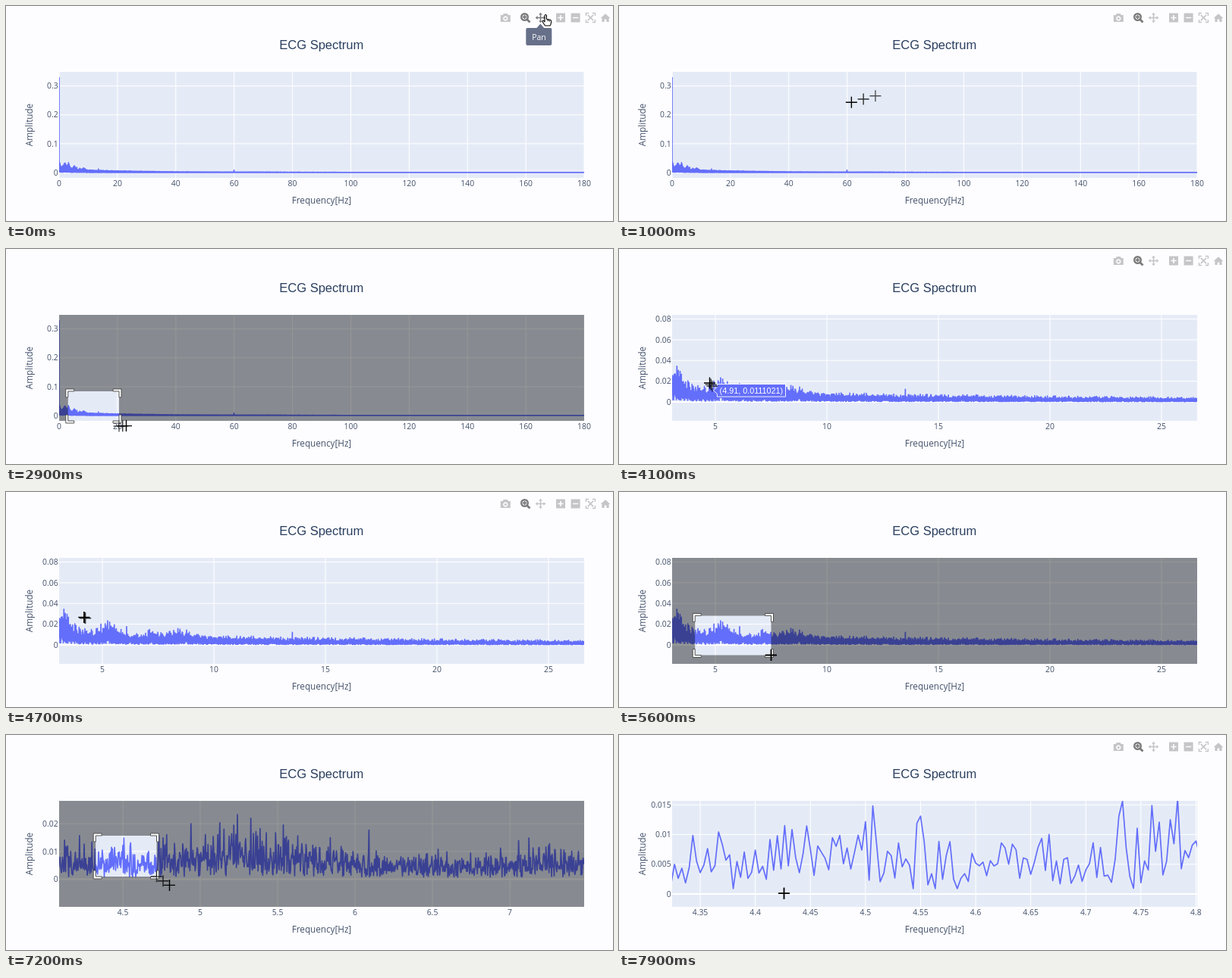
Animation, 800 px wide and 284 px high, one loop 8000 ms. Source, as an HTML page:

```html
<!DOCTYPE html>
<html lang="en">
<head>
<meta charset="utf-8">
<title>ECG Spectrum</title>
<style>
  html, body { margin: 0; width: 100%; height: 100%; overflow: hidden; background: #fdfdff; }
  svg { display: block; width: 100vw; height: 100vh; }
  text { fill: #43516a; font-family: "Open Sans", sans-serif; }
  .title { fill: #2a3f5f; font: 16.5px "Liberation Sans", Arial, sans-serif; text-anchor: middle; }
  .axis { font-size: 11.7px; text-anchor: middle; }
  .tick { font-size: 10.4px; }
  .xt { text-anchor: middle; }
  .yt { text-anchor: end; }
  .grid { stroke: #fff; stroke-width: 1; fill: none; }
  .zero { stroke: #fff; stroke-width: 1.8; }
  .trace { fill: none; stroke: #636efa; stroke-width: 1.7; stroke-linejoin: round; }
  .icon { fill: #444; fill-rule: evenodd; opacity: .3; }
  .icon.on { opacity: .7; }
  .line { fill: none; stroke: #444; stroke-width: 2; }
  .tip rect, .tip path { fill: #677089; }
  .tip text { fill: #fff; font-size: 10.4px; text-anchor: middle; }
  .label path { fill: #636efa; stroke: #fff; stroke-width: .9; }
  .label text { fill: #fff; font: 10.8px "Liberation Sans", Arial, sans-serif; }
  .cross { stroke: #000; stroke-width: 1.4; }
  .hand { fill: #fff; stroke: #000; stroke-width: 1.1; stroke-linejoin: round; }
</style>
</head>
<body>
<svg viewBox="0 0 800 284">
  <defs>
    <clipPath id="clip"><rect x="70" y="87" width="692" height="140"/></clipPath>
    <path id="plus" d="M-7.5 0H7.5M0-7.5V7.5"/>
  </defs>
  <text class="title" x="415.8" y="57">ECG Spectrum</text>
  <rect x="70" y="87" width="692" height="140" fill="#e5ebf6"/>
  <g id="views"></g>
  <text class="axis" x="416" y="260.8">Frequency[Hz]</text>
  <text class="axis" transform="translate(34.8 157) rotate(-90)">Amplitude</text>

  <g id="bar">
    <g class="icon" transform="translate(658.3 15.5)">
      <path d="M-6.5-3.5h3l1-2h5l1 2h3v9h-13zM0-2.2a3.2 3.2 0 1 0 .01 0zM0-.6a1.6 1.6 0 1 0 .01 0z"/>
    </g>
    <g class="icon on" transform="translate(684.5 15.5)">
      <circle class="line" cx="-1" cy="-1" r="4.3" style="stroke-width:2.4"/>
      <path class="line" d="M2.2 2.2L6 6" style="stroke-width:2.8"/>
      <path class="line" d="M-3.6-1h5.2M-1-3.6v5.2" style="stroke-width:1.8"/>
    </g>
    <g class="icon" id="pan" transform="translate(704.5 15.5)">
      <path class="line" d="M-5 0H5M0-5V5" style="stroke-width:1.5"/>
      <path d="M0-6.8l2.5 2.8h-5zM0 6.8l2.5-2.8h-5zM-6.8 0l2.8-2.5v5zM6.8 0l-2.8-2.5v5z"/>
    </g>
    <g class="icon" transform="translate(731 15.5)">
      <path d="M-6-6H6V6H-6zM-.8-3.6V-.8H-3.6V.8H-.8V3.6H.8V.8H3.6V-.8H.8V-3.6z"/>
    </g>
    <g class="icon" transform="translate(750.6 15.5)"><path d="M-6-6H6V6H-6zM-3.6-.8V.8H3.6V-.8z"/></g>
    <g class="icon" transform="translate(770.4 15.5)">
      <path class="line" d="M-6-2.5V-6H-2.5M2.5-6H6V-2.5M6 2.5V6H2.5M-2.5 6H-6V2.5" style="stroke-width:1.4"/>
      <path class="line" d="M-3.6-3.6L3.6 3.6M3.6-3.6L-3.6 3.6" style="stroke-width:1.5"/>
    </g>
    <g class="icon" transform="translate(790 15.5)"><path d="M-6.3.6L0-5.2L6.3.6H4.6V5.4H1.4V2H-1.4V5.4H-4.6V.6z"/></g>
  </g>
  <g class="tip" id="tip">
    <path d="M699 29.5l5.3-6 5.3 6z"/>
    <rect x="685.3" y="29" width="34" height="23" rx="2"/>
    <text x="702.5" y="44.6">Pan</text>
  </g>

  <path id="shade" fill-rule="evenodd"/>
  <path id="corners" fill="#fff" stroke="#444" stroke-width=".9"/>
  <g class="label" id="label"><path/><text x="8.2" y="3.9"></text></g>

  <use class="cross ghost" href="#plus" opacity=".65"/>
  <use class="cross ghost" href="#plus" opacity=".8"/>
  <use class="cross" id="cross" href="#plus"/>
  <path id="arrow" class="hand" d="M0 0V12l2.8-2.6L4.8 13.6l1.8-.8-1.9-4H8.4z"/>
  <g id="hand" class="hand">
    <path d="M-2-5.2c0-1.7 2.4-1.7 2.4 0v4.4l4.8 1c1.1.3 1.6 1 1.5 2.2L6 6.2 5 8H-1.5L-4.8 3c-.8-1.4.9-2.3 1.8-1.2l1 1.2z"/>
    <path d="M2.3 0v2M4.4.5v1.9" fill="none"/>
  </g>
</svg>
<script>
const LOOP = 8000, STEP = 100;
const LEFT = 70, RIGHT = 762, TOP = 87, BOTTOM = 227;
const RATE = 300; // spectrum samples per Hz
const $ = id => document.getElementById(id);
const clamp = (v, lo, hi) => Math.min(hi, Math.max(lo, v));

// Noise level: a slow decay with bumps of [centre, width, height], in thousandths.
const BUMPS = [[0, .4, 13], [2, 1.3, 6], [3.3, .4, 4], [5, 2.5, .9], [5.35, .45, 2.6], [7.25, .25, 1.3], [8.6, .6, 2]];
const bell = (f, [mid, width, height]) => height * Math.exp(-(((f - mid) / width) ** 2));
const level = f => (4 * Math.exp(-f / 22) + .15 + BUMPS.reduce((sum, b) => sum + bell(f, b), 0)) / 1000;

// Lines that stand out of the noise: [frequency, amplitude].
const PEAKS = [[0, .33], [4.22, .0157], [4.366667, .0104374], [4.426667, .0115], [4.546667, .0119],
  [4.73, .0131], [4.776667, .0125], [4.91, .0111021], [4.94, .02], [5.24, .0233], [5.326667, .022],
  [6.09, .0177], [13.52, .0122], [60, .008]];

function makeSpectrum() {
  let seed = 20731;
  const rand = () => (seed = (seed * 16807) % 2147483647) / 2147483647;
  const data = Array.from({ length: 180 * RATE + 1 }, (_, i) =>
    level(i / RATE) * clamp(Math.sqrt(-2 * Math.log(rand())), .2, 3.3));
  PEAKS.forEach(([f, v]) => data[Math.round(f * RATE)] = v);
  return data;
}
const spectrum = makeSpectrum();

// f0: frequency at the left edge; sx, sy: pixels per unit; y0: zero line;
// drag: when the next zoom box is started; xt: first, step, count; yt: step, count.
const VIEWS = [
  { at: 0, drag: 1900, f0: 0, sx: 692 / 180, y0: 220, sy: 381.5, xt: [0, 20, 10], yt: [.1, 4] },
  { at: 3300, drag: 5000, f0: 3.061, sx: 29.4, y0: 202, sy: 1369, xt: [5, 5, 5], yt: [.02, 5] },
  { at: 5800, drag: 6800, f0: 4.0882, sx: 204, y0: 190.5, sy: 3670, xt: [4.5, .5, 6], yt: [.01, 3] },
  { at: 7400, f0: 4.3245, sx: 1452, y0: 210, sy: 7850, xt: [4.35, .05, 10], yt: [.005, 4] }
];
VIEWS.forEach(v => {
  v.x = f => LEFT + (f - v.f0) * v.sx;
  v.y = a => v.y0 - a * v.sy;
  v.sample = x => Math.round(((x - LEFT) / v.sx + v.f0) * RATE);
});
// Each drag starts at the top left corner of the view it opens.
const DRAGS = VIEWS.slice(1).map((next, i) => {
  const v = VIEWS[i];
  return { from: v.drag, to: next.at, x: v.x(next.f0), y: v.y((next.y0 - TOP) / next.sy) };
});

function tracePath(v) {
  const first = Math.max(0, v.sample(LEFT) - 1);
  const last = Math.min(spectrum.length - 1, v.sample(RIGHT) + 1);
  const group = Math.max(1, Math.round(.3 * RATE / v.sx));
  const pts = [];
  for (let i = first; i <= last; i += group) {
    const part = spectrum.slice(i, i + group), x = v.x(i / RATE).toFixed(2);
    pts.push(x + " " + v.y(Math.max(...part)).toFixed(1));
    if (group > 1) pts.push(x + " " + v.y(Math.min(...part)).toFixed(1));
  }
  return "M" + pts.join("L");
}

function viewMarkup(v) {
  let grid = "", text = "";
  const [start, step, count] = v.xt, [yStep, yCount] = v.yt;
  for (let i = 0; i < count; i++) {
    const f = start + i * step, x = v.x(f);
    grid += `M${x} ${TOP}V${BOTTOM}`;
    text += `<text class="tick xt" x="${x}" y="238.2">${+f.toFixed(2)}</text>`;
  }
  for (let i = 0; i < yCount; i++) {
    const y = v.y(i * yStep);
    if (i) grid += `M${LEFT} ${y}H${RIGHT}`;
    text += `<text class="tick yt" x="68.7" y="${y + 3.7}">${+(i * yStep).toFixed(3)}</text>`;
  }
  return `<g><g clip-path="url(#clip)"><path class="grid" d="${grid}"/>
    <path class="zero" d="M${LEFT} ${v.y0}H${RIGHT}"/>
    <path class="trace" d="${tracePath(v)}"/></g>${text}</g>`;
}
$("views").innerHTML = VIEWS.map(viewMarkup).join("");
const groups = [...$("views").children];

// Pointer stops: time, x, y.
const POINTER = [[0, 712, 18], [100, 712, 18], [1500, 81, 188], [1760, 81, 188], [1900, 99, 216.5],
  [2830, 149, 234], [3000, 172, 233], [3400, 172, 232], [4000, 124.4, 183], [4100, 119.5, 177],
  [4800, 100, 163.5], [5000, 100, 163.5], [5500, 200.5, 215.5], [5900, 200.5, 215.5], [6500, 126.7, 133],
  [6600, 122, 135], [6800, 118.3, 133], [7200, 215.5, 198.4], [7450, 215.5, 198.4], [7700, 217.5, 209.3]];

function pointer(t) {
  const i = POINTER.findIndex(p => p[0] > t);
  if (i < 1) return POINTER.at(i).slice(1);
  const [t0, x0, y0] = POINTER[i - 1], [t1, x1, y1] = POINTER[i], k = (t - t0) / (t1 - t0);
  return [x0 + (x1 - x0) * k, y0 + (y1 - y0) * k];
}

const show = (el, on) => el.style.display = on ? "" : "none";
const place = (el, [x, y]) => el.setAttribute("transform", `translate(${x} ${y})`);

// The toolbar fades out as a drag starts and back in after the zoom.
const barOpacity = t => Math.min(...DRAGS.map(d =>
  Math.max(clamp((d.from + 50 - t) / 200, 0, 1), clamp((t - d.to) / 300, 0, 1))));

function corner(x, y, dx, dy) {
  const n = 8, w = 3;
  return `M${x - w * dx} ${y + n * dy}h${w * dx}v${-n * dy}h${n * dx}v${-w * dy}h${-(n + w) * dx}z`;
}

function drawDrag(t, drag) {
  const boxed = drag && t > drag.from;
  show($("shade"), drag);
  show($("corners"), boxed);
  if (!drag) return;
  let d = `M${LEFT} ${TOP}H${RIGHT}V${BOTTOM}H${LEFT}z`;
  if (boxed) {
    const { x, y } = drag, [px, py] = pointer(t - 70), b = Math.min(py, BOTTOM);
    d += `M${x} ${y}H${px}V${b}H${x}z`;
    $("corners").setAttribute("d",
      corner(x, y, 1, 1) + corner(px, y, -1, 1) + corner(x, b, 1, -1) + corner(px, b, -1, -1));
  }
  $("shade").setAttribute("d", d);
  $("shade").setAttribute("opacity", .41 * Math.min(1, (t - drag.from + 20) / 200));
}

// The label follows the pointer late and needs a sample within 20 pixels.
function drawLabel(t, view, drag) {
  const [px, py] = pointer(t - 100), i = view.sample(px), y = view.y(spectrum[i]);
  const near = !drag && Math.abs(y - py) < 20;
  show($("label"), near);
  if (!near) return;
  const [shape, text] = $("label").children;
  text.textContent = `(${+(i / RATE).toFixed(6)}, ${+spectrum[i].toFixed(7)})`;
  const w = text.getComputedTextLength() + 6.5;
  shape.setAttribute("d", `M0 0L5-4.5V-8.3h${w}v16.6h${-w}V4.5z`);
  place($("label"), [view.x(i / RATE), y]);
}

function drawPointer(t) {
  const p = pointer(t), onBar = t < 200, inPlot = p[1] >= TOP;
  show($("tip"), onBar);
  $("pan").classList.toggle("on", onBar);
  show($("hand"), onBar);
  show($("arrow"), !onBar && !inPlot);
  show($("cross"), inPlot);
  ["hand", "arrow", "cross"].forEach(id => place($(id), p));
  document.querySelectorAll(".ghost").forEach((el, i) => {
    const q = pointer(t - 70 + i * 35);
    show(el, inPlot && q[1] >= TOP);
    place(el, q);
  });
}

function draw(t) {
  const view = VIEWS.findLast(v => t >= v.at);
  const drag = DRAGS.find(d => t >= d.from && t < d.to);
  groups.forEach((g, i) => show(g, VIEWS[i] === view));
  $("bar").setAttribute("opacity", barOpacity(t));
  drawDrag(t, drag);
  drawLabel(t, view, drag);
  drawPointer(t);
}

let begin;
function tick(now) {
  begin ??= now;
  draw(Math.floor((now - begin) % LOOP / STEP) * STEP);
  requestAnimationFrame(tick);
}
draw(0);
requestAnimationFrame(tick);
</script>
</body>
</html>
```
